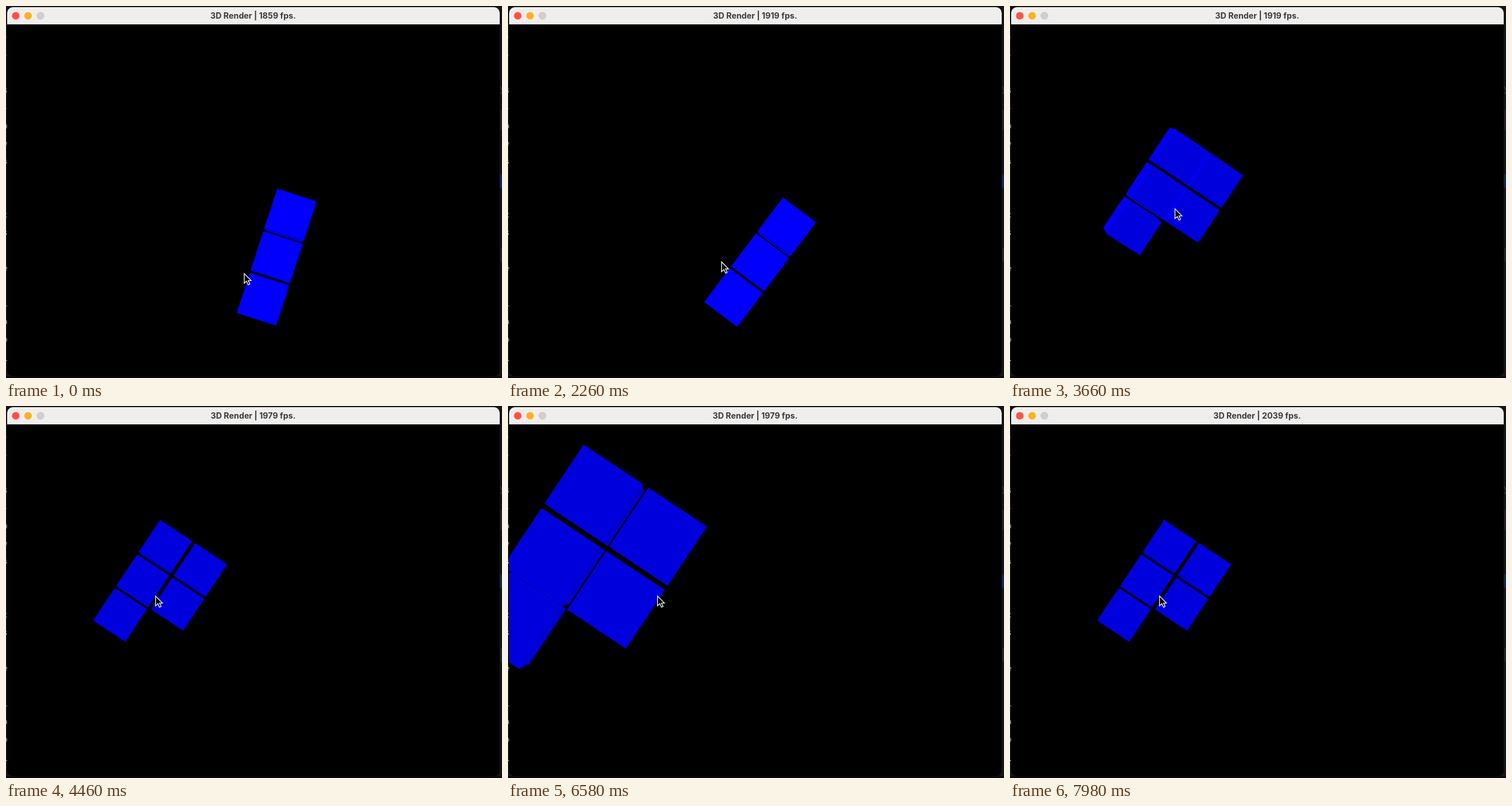
These frames come from a looping animation (864x648 px, 8000 ms). An HTML page:

```html
<!DOCTYPE html>
<html lang="en">
<head>
<meta charset="utf-8">
<title>3D Render</title>
<style>
  html, body { margin: 0; width: 100%; height: 100%; overflow: hidden; background: #000; }
  svg { display: block; width: 864px; height: 648px; }
  #title { font: 700 14.25px Inter, "Liberation Sans", sans-serif; fill: #3b3a39; text-anchor: middle; }
  #behind { font: 12px "Noto Sans Mono", "DejaVu Sans Mono", monospace; fill: #b4b4b4; text-anchor: end; }
  #cubes { stroke-width: .3; stroke-linejoin: round; }
</style>
</head>
<body>
<svg viewBox="0 0 864 648">
  <defs>
    <clipPath id="frame"><rect x="2" y="2" width="858" height="643" rx="10"/></clipPath>
    <clipPath id="view"><rect x="2" y="32" width="858" height="613"/></clipPath>
  </defs>
  <rect width="864" height="648" fill="#141515"/>
  <rect y="645" width="864" height="3" fill="#0a0a0a"/>
  <g id="behind"></g>
  <rect x="861" y="181" width="3" height="35" fill="#222322"/>
  <rect x="860" y="293" width="4" height="24" fill="#0a2a50"/>
  <rect x="861" y="421" width="3" height="24" fill="#242526"/>
  <path d="M861 140l3 8v4h-3" fill="none" stroke="#4a4a35"/>
  <g clip-path="url(#frame)">
    <rect width="864" height="648"/>
    <rect x="2" y="2" width="858" height="30" fill="#efeeed"/>
    <circle cx="17" cy="17" r="6.6" fill="#ff5148"/>
    <circle cx="38.5" cy="17" r="6.6" fill="#fdb027"/>
    <circle cx="60" cy="17" r="6.2" fill="#cfcfce" stroke="#bfbfbe" stroke-width=".8"/>
    <text id="title" x="430.5" y="21.5"></text>
    <g clip-path="url(#view)"><g id="cubes"></g></g>
  </g>
  <path id="cursor" d="M0 0V17L4 13.3L6.9 19.6L9.7 18.3L6.9 12.3H12Z" fill="#000" stroke="#fff" stroke-width="1.3"/>
</svg>
<script>
const LOOP = 8000, FOCAL = 1500, HALF = 0.462, SPREAD = 0.51;
const CENTER = { x: 431, y: 354 };
const NS = "http://www.w3.org/2000/svg";
const $ = id => document.getElementById(id);
const { sin, cos, PI } = Math;

const ramp = (t, from, to) => Math.min(1, Math.max(0, (t - from) / (to - from)));
const ease = (t, from, to) => {
  const s = ramp(t, from, to);
  return s * s * (3 - 2 * s);
};

// First the column rolls, then the piece turns a quarter to face the camera
function poseAt(t) {
  const tilt = ease(t, 0, 1140);
  const turned = ramp(t, 2364, 4069), arc = sin(PI * turned);
  const yaw = ease(t, 2364, 4069);
  const far = 20.25 + 1.05 * yaw - 0.6 * arc;
  const push = 11.75 * (ramp(t, 5590, 6813) - ramp(t, 7000, 7750));
  return {
    x: 471.5 - 31 * tilt - 172 * ease(t, 2164, 3982),
    y: 437.5 + 8.8 * tilt - 121.5 * ease(t, 2498, 4011),
    far, near: far - push,
    roll: 18 + 19 * tilt - 3.4 * ease(t, 2900, 3660),
    yaw: 90 * yaw,
    pitch: 18 * arc * (1 - turned) ** 2
  };
}

function cursorAt(t) {
  const first = ease(t, 0, 1140);
  return [
    415 - 41 * first - 113.5 * ease(t, 2081, 4393),
    466 - 20 * first - 115 * ease(t, 2199, 4237)
  ];
}

function makeCamera(t) {
  const { x: px, y: py, far, near, roll, yaw, pitch } = poseAt(t);
  const [cr, sr, cy, sy, cp, sp] = [roll, yaw, pitch]
    .flatMap(a => [cos(a * PI / 180), sin(a * PI / 180)]);

  const turn = ([u, v, w]) => {
    const x = u * sy - w * cy, z = u * cy + w * sy;
    const y = v * cp - z * sp;
    return [x * cr - y * sr, x * sr + y * cr, z * cp + v * sp];
  };
  // Moving closer spreads the piece away from the view's centre
  const slideX = (px - CENTER.x) * (far - near);
  const slideY = (py - CENTER.y) * (far - near);
  const project = p => {
    const [x, y, z] = turn(p), d = near + z;
    return [px + (slideX + FOCAL * x) / d, py + (slideY + FOCAL * y) / d];
  };
  return { turn, project };
}

// Two columns, the right one missing its lowest cube
const cells = [];
for (const u of [-SPREAD, SPREAD])
  for (let v = -1; v <= (u < 0 ? 1 : 0); v++) cells.push([u, v, 0]);

// Blue level of the near and far side on each axis
const LEVELS = [[252, 220], [238, 226], [220, 220]];
const RING = [[-1, -1], [1, -1], [1, 1], [-1, 1]];

function faceCorners(center, axis, side) {
  return RING.map(([a, b]) => {
    const p = center.slice();
    p[axis] += side * HALF;
    p[(axis + 1) % 3] += a * HALF;
    p[(axis + 2) % 3] += b * HALF;
    return p;
  });
}

function area(pts) {
  return pts.reduce((sum, [x, y], i) => {
    const [nx, ny] = pts[(i + 1) % pts.length];
    return sum + x * ny - nx * y;
  }, 0);
}

// Faces seen at a slant are a little darker
function shade(turn, axis, side) {
  const normal = [0, 0, 0];
  normal[axis] = side;
  const facing = Math.max(0, -turn(normal)[2]);
  const level = LEVELS[axis][side < 0 ? 0 : 1] * (0.94 + 0.06 * facing);
  return `rgb(0,0,${Math.round(level)})`;
}

const addTo = (parent, tag) => parent.appendChild(document.createElementNS(NS, tag));
const pool = Array.from({ length: cells.length * 3 }, () => addTo($("cubes"), "polygon"));

function drawCubes({ turn, project }) {
  const ordered = cells.slice().sort((a, b) => turn(b)[2] - turn(a)[2]);
  let n = 0;
  for (const cell of ordered)
    for (let axis = 0; axis < 3; axis++)
      for (const side of [-1, 1]) {
        const pts = faceCorners(cell, axis, side).map(project);
        if (area(pts) * side >= 0) continue;
        const color = shade(turn, axis, side), face = pool[n++];
        face.setAttribute("points", pts.map(p => p.map(v => v.toFixed(2))).join(" "));
        face.setAttribute("fill", color);
        face.setAttribute("stroke", color);
      }
  while (n < pool.length) pool[n++].setAttribute("points", "");
}

function render(t) {
  drawCubes(makeCamera(t));
  $("cursor").setAttribute("transform", `translate(${cursorAt(t).map(v => v.toFixed(2))})`);
  const rate = 1859 + 60 * Math.floor((t + 600) / 2450);
  $("title").textContent = `3D Render | ${rate} fps.`;
}

// Line ends of the text behind the window
[..."-- s-ays .ts e lao_"].forEach((ch, i) => {
  const line = addTo($("behind"), "text");
  line.setAttribute("x", 2.6);
  line.setAttribute("y", 58 + 31 * i);
  line.textContent = ch;
});

const start = performance.now();
function tick(now) {
  render(Math.max(0, now - start) % LOOP);
  requestAnimationFrame(tick);
}
render(0);
requestAnimationFrame(tick);
</script>
</body>
</html>
```
